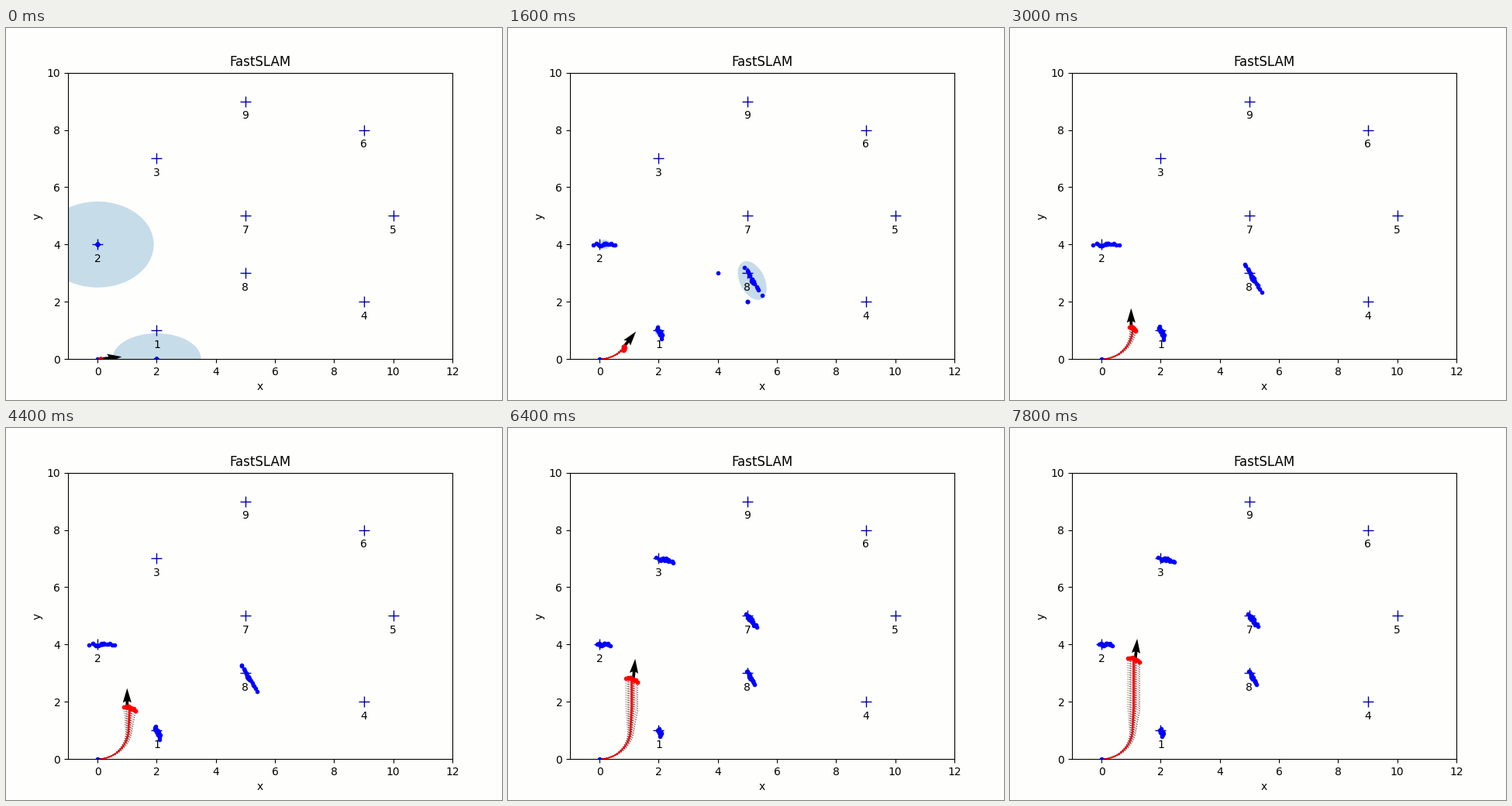
Animation of 640x480 px, one loop 8000 ms. Source, as a matplotlib script:

```python
import numpy as np
import matplotlib.pyplot as plt
from matplotlib.animation import FuncAnimation
from matplotlib.patches import Ellipse

FRAMES, STEP_MS = 40, 200
COUNT = 20
RESAMPLE = 29          # the map tightens here
PAPER = "#fefefc"

LANDMARKS = [(2, 1), (0, 4), (2, 7), (9, 2), (10, 5), (9, 8), (5, 5), (5, 3), (5, 9)]

# Sighted landmarks: number -> (first frame, ellipse half axes at first, tilt)
SIGHTED = {1: (0, (1.5, 0.9), 0), 2: (0, (1.9, 1.5), 0), 8: (7, (1.44, 0.84), -65),
           7: (25, (0.7, 0.5), -45), 3: (25, (0.94, 0.66), -15)}

# Rank of each particle, -1 (left) to 1 (right), crowded in the middle
t = np.linspace(-1, 1, COUNT)
RANK = np.sign(t) * np.abs(t) ** 1.8

rng = np.random.default_rng(4)


def jitter(size):
    return np.clip(rng.normal(0, size, (COUNT, 2)), -1.5 * size, 1.5 * size)


def course(frame):
    """Quarter turn of radius 1, then straight up, 0.1 per step."""
    s = 0.1 * (frame + 1)
    a = min(s, np.pi / 2)
    return np.array([np.sin(a), 1 - np.cos(a) + s - a]), a


def pose(frame):
    """Arrow: the course with a late drift to the right."""
    spot, heading = course(frame)
    ease = np.clip((frame - 24) / 8, 0, 1)
    return spot + [0.14 * ease, 0.03 * ease], heading - 0.09 * ease


swarm_noise = jitter(0.02)


def swarm(frame):
    """Particles fan out sideways around the course in a shallow arc."""
    spot, h = course(frame)
    reach = min(1, (frame / 22) ** 1.5)
    side = reach * (0.1 + 0.2 * RANK)
    ahead = min(1, frame / 10) * (0.07 - 0.07 * RANK - 0.05 * RANK ** 2)
    right, forward = [np.sin(h), -np.cos(h)], [np.cos(h), np.sin(h)]
    return spot + np.outer(side, right) + np.outer(ahead, forward) + reach * swarm_noise


class Estimate:
    """One mapped landmark: heading errors swing its dots around the sighting spot."""

    def __init__(self, number, first, half, tilt):
        self.home = np.array(LANDMARKS[number - 1], float)
        self.first, self.half = first, np.array(half)
        dx, dy = self.home - course(first)[0]
        self.swing = np.array([dy, -dx])
        self.noise = jitter(0.028)
        self.patch = Ellipse((0, 0), 1, 1, angle=tilt, fc="C0", alpha=0.25, lw=0, zorder=0.9)

    def update(self, frame):
        age = frame - self.first
        self.patch.set_visible(age >= 0)
        if age < 0:
            return np.empty((0, 2))
        fresh = 1 / (age + 1)
        width = 0.01 * min(frame, 10) if frame < RESAMPLE else 0.05
        middle = self.home + self.swing * (0.035 + 0.05 * fresh)
        dots = middle + np.outer(RANK * width * (1 + fresh), self.swing)
        # A new landmark starts on whole units; a few particles lag one step.
        if age == 0:
            dots, middle = np.trunc(dots), np.trunc(middle)
        else:
            dots += self.noise
            if age == 1:
                dots[::6] = np.trunc(dots[::6])
        w, h = 2 * self.half * fresh
        self.patch.set(center=middle, width=w, height=h)
        return dots


estimates = [Estimate(n, *spec) for n, spec in SIGHTED.items()]
history = np.array([np.zeros((COUNT, 2))] + [swarm(f) for f in range(FRAMES)])

fig, ax = plt.subplots(figsize=(6.4, 4.8), dpi=100, facecolor=PAPER)
ax.set_facecolor(PAPER)
ax.set(xlim=(-1, 12), ylim=(0, 10), xlabel="x", ylabel="y", title="FastSLAM")

for n, (x, y) in enumerate(LANDMARKS, 1):
    ax.plot(x, y, "+", ms=10, mew=1, color="#0000a8", zorder=1.5)
    ax.text(x, y - 0.5, str(n), ha="center", va="center")
for e in estimates:
    ax.add_patch(e.patch)

arrow = ax.quiver([0], [0], [1], [0], scale=18, width=0.0075, color="k", zorder=1.6)
trails = []
for rank in RANK:
    core = abs(rank) < 0.08
    style = dict(color="r", lw=0.8) if core else dict(color="#602828", lw=0.8, ls=":", alpha=0.7)
    trails += ax.plot([], [], zorder=1.9 if core else 1.8, **style)
swarm_dots, = ax.plot([], [], "r.", zorder=2.1)
map_dots, = ax.plot([], [], "b.", zorder=2)


def update(frame):
    spot, heading = pose(frame)
    arrow.set_offsets([spot])
    arrow.set_UVC([np.cos(heading)], [np.sin(heading)])
    past = history[:frame + 2]
    for i, line in enumerate(trails):
        line.set_data(*past[:, i].T)
    swarm_dots.set_data(*past[-1].T)
    # Landmarks not yet sighted wait at the origin.
    dots = np.vstack([np.zeros((1, 2))] + [e.update(frame) for e in estimates])
    map_dots.set_data(*dots.T)
    return [arrow, swarm_dots, map_dots, *trails]


anim = FuncAnimation(fig, update, frames=FRAMES, interval=STEP_MS, init_func=lambda: update(0),
                     repeat=True, repeat_delay=0, blit=False)
plt.show()
```
